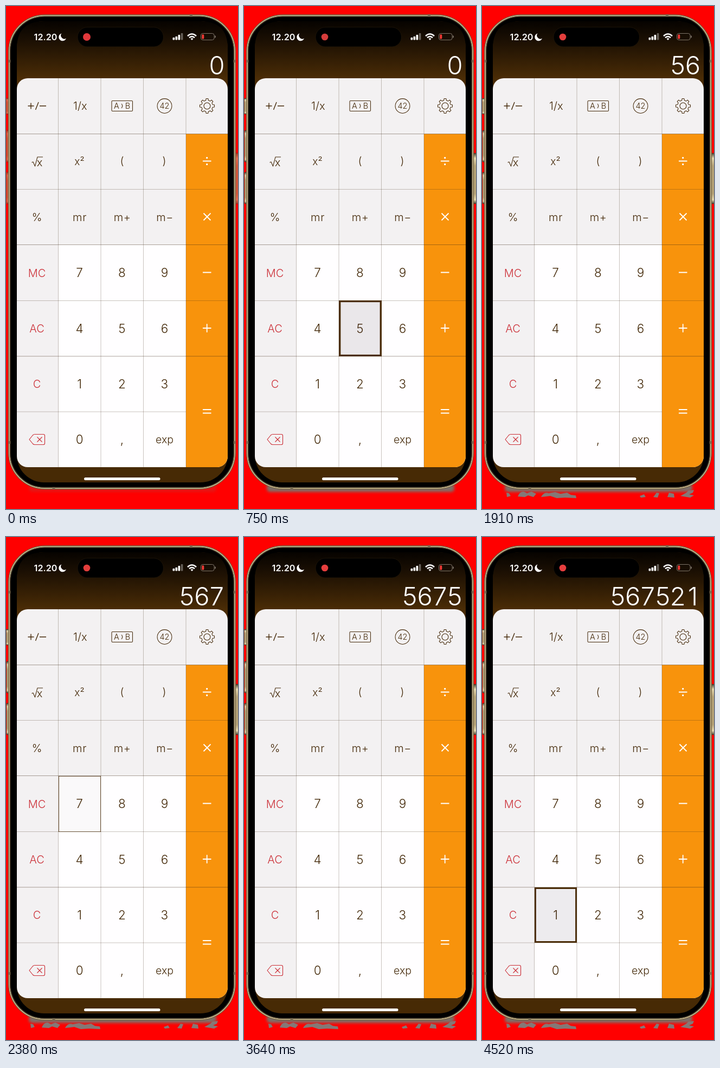
An HTML page for the animation above (4550 ms loop, 428x926 px).

```html
<!DOCTYPE html>
<html lang="en">
<head>
<meta charset="utf-8">
<title>Calculator</title>
<style>
  html, body { margin: 0; width: 100%; height: 100%; overflow: hidden; background: #f00; }
  #stage { position: absolute; left: 0; top: 0; width: 428px; height: 926px; overflow: hidden; }
  svg { position: absolute; left: 0; top: 0; display: block; }
  text { font-family: Inter, Roboto, sans-serif; text-anchor: middle; }

  #stage, #stage * { animation-duration: 4550ms; animation-iteration-count: infinite; animation-timing-function: linear; }

  .keys text { font-size: 20px; font-weight: 300; fill: #452a0a; }
  .keys .num text { font-size: 22.5px; }
  .keys .small text { font-size: 14.5px; }
  .keys .red text { fill: #cc3038; }
  .readout text { font-size: 47px; font-weight: 300; fill: #fff; }

  .zero { animation-name: zero; }
  .strip { animation-name: strip; }
  .zero, .strip, .warm, .glow, .blotA, .blotB, .presses { animation-timing-function: step-end !important; }
  @keyframes zero { 0% { opacity: 1 } 18.02%, 100% { opacity: 0 } }
  @keyframes strip {
    0% { transform: translateX(27.7px) }
    18.02% { transform: translateX(0) }
    32.09% { transform: translateX(-27.7px) }
    49.01% { transform: translateX(-55.4px) }
    71.87% { transform: translateX(-83.1px) }
    84.83% { transform: translateX(-110.8px) }
    97.36%, 100% { transform: translateX(-138.5px) }
  }

  .presses { animation-name: late; }
  @keyframes late { 0% { visibility: hidden } 10%, 100% { visibility: visible } }
  .press { position: absolute; width: 78.5px; height: 102.5px; animation-name: press; animation-delay: calc(var(--at) * 1ms - 4550ms); }
  @keyframes press {
    0% { background: rgba(25,10,30,.07); box-shadow: inset 0 0 0 2.5px #4a2c08 }
    1.32%, 2.64% { background: rgba(25,10,30,.13); box-shadow: inset 0 0 0 5px #4a2c08 }
    5.82%, 100% { background: rgba(25,10,30,0); box-shadow: inset 0 0 0 0 #4a2c08 }
  }

  .warm { animation-name: warm; }
  @keyframes warm { 0% { opacity: .65 } .66%, 100% { opacity: 0 } }
  .glow { animation-name: glow; }
  @keyframes glow { 0% { opacity: .2 } .66%, 100% { opacity: 1 } }
  .blotA { animation-name: blotA; }
  @keyframes blotA { 0% { opacity: 0 } 27.91% { opacity: 1 } 41.98%, 100% { opacity: 0 } }
  .blotB { animation-name: blotB; }
  @keyframes blotB { 0% { opacity: 0 } 41.98%, 100% { opacity: 1 } }
  .dot { animation-name: dot; }
  @keyframes dot {
    0% { fill: #e0383c; r: 7px }
    2% { r: 6.3px }
    8%, 12% { fill: #c43a3a }
    20%, 59% { fill: #e33e3c }
    70% { fill: #d43c3c }
    80%, 100% { fill: #e63e3e; r: 6.3px }
  }
</style>
</head>
<body>
<div id="stage">
<svg width="428" height="926" viewBox="0 0 428 926">
  <defs>
    <linearGradient id="top" x1="0" y1="28" x2="0" y2="133" gradientUnits="userSpaceOnUse">
      <stop offset="0" stop-color="#060300"/><stop offset=".35" stop-color="#1c1003"/><stop offset="1" stop-color="#4a2c06"/>
    </linearGradient>
    <linearGradient id="gold" x1="0" y1="0" x2="0" y2="1">
      <stop offset="0" stop-color="#4a4030"/><stop offset=".1" stop-color="#e4d6ac"/><stop offset=".25" stop-color="#b5a276"/>
      <stop offset=".8" stop-color="#b5a276"/><stop offset=".92" stop-color="#e4d6ac"/><stop offset="1" stop-color="#4a4030"/>
    </linearGradient>
    <clipPath id="pad"><rect x="20" y="133" width="389" height="716" rx="20"/></clipPath>
    <clipPath id="view"><rect x="20" y="80" width="382.8" height="53"/></clipPath>
    <filter id="soft" x="-10%" y="-100%" width="120%" height="300%"><feGaussianBlur stdDeviation="2.4"/></filter>
  </defs>

  <rect width="428" height="926" fill="#f00"/>
  <rect class="glow" x="42" y="880" width="346" height="14.5" rx="6" fill="#7b716a" filter="url(#soft)"/>
  <g fill="#857876">
    <path class="blotA" d="M47 905l3-11 5 2 2 8-5-3zM66 904q1-8 12-9l7 2-3 6zM81 897l6-1-3 8zM109 905l4-9 10-2 8 3-2 8-9-2zM140 905q4-10 9-9l5 9zM314 897l10-1 1 5-5 4-6-1zM366 903l9-7 15-4 1 6-10 1-7 4z"/>
    <path class="blotB" d="M45 896l5 1 3 5-7 2zM66 903q3-9 11-9l6 3 8-3 9 4-5 6-10-3-6 3zM109 904q5-10 14-7l12-2 10 3 12-2 7 4 9 1 1 5-21-1-15 1-12-4zM291 902l8-3 3 5-9 1zM316 904l6-8 5 1-3 8zM342 904l3-8 9 2 1 7zM366 902l11-6 4-4 10-1-2 5-7 3 9 2-7 4z"/>
  </g>

  <!-- body and side buttons -->
  <g fill="url(#gold)" stroke="#3a2d1a" stroke-width=".6">
    <rect x=".5" y="170" width="4.5" height="29" rx="1"/>
    <rect x="1" y="229" width="4.5" height="58" rx="1"/>
    <rect x="1" y="306" width="4.5" height="58" rx="1"/>
    <rect x="423.5" y="271" width="5" height="93" rx="1"/>
  </g>
  <path class="warm" fill="#e0301c" d="M0 170h5v29H0zM0 229h5v58H0zM0 306h5v58H0zM423 271h5v93h-5z"/>
  <rect x="4.5" y="16" width="419" height="873.5" rx="67" fill="#7a6a48" stroke="#6f6043"/>
  <rect x="6.3" y="17.8" width="415.4" height="869.9" rx="65" fill="#000" stroke="#cdbd94" stroke-width="1.7"/>
  <rect x="8" y="19.5" width="412" height="866.5" rx="63" fill="#000" stroke="#3d3424" stroke-width="1.6"/>
  <path d="M4 101.5h4M420 101.5h4M4 803.5h4M420 803.5h4M341.5 15.5v4M88 886v4" stroke="#766a52" stroke-width="5"/>
  <rect x="20" y="28" width="389" height="849" rx="50" fill="#472a05"/>
  <path d="M20 154V78q0-50 50-50h289q50 0 50 50v76z" fill="url(#top)"/>

  <!-- status bar -->
  <rect x="132" y="39" width="158.5" height="36" rx="18" fill="#000" stroke="#21170a" stroke-width=".8"/>
  <circle class="dot" cx="149" cy="57" r="6.3" fill="#e33e3c"/>
  <text x="73" y="62.8" font-size="16.2" font-weight="600" fill="#fff">12.20</text>
  <path d="M102.5 50.5a7 7 0 1 0 8.500 9a6.300 6.300 0 0 1-8.500-9z" fill="#fff"/>
  <g fill="#fff">
    <rect x="307.5" y="58" width="3.7" height="4.5" rx="1"/>
    <rect x="312.5" y="56" width="3.7" height="6.5" rx="1"/>
    <rect x="317.5" y="53" width="3.7" height="9.5" rx="1"/>
    <rect x="322.7" y="50" width="3.7" height="12.5" rx="1" opacity=".35"/>
  </g>
  <g fill="none" stroke="#fff" stroke-width="2.6">
    <path d="M335 55.2q8-7.400 16 0M338 58.4q5-4.600 10 0"/>
    <path d="M340.5 60.2q2.500-2 5 0l-2.500 2.800z" fill="#fff" stroke="none"/>
  </g>
  <rect x="359.5" y="50.5" width="24.5" height="12" rx="3.6" fill="none" stroke="#7d7469"/>
  <rect x="361.3" y="52.3" width="4" height="8.4" rx="1.8" fill="#f03a36"/>
  <path d="M385.6 54.5q2 2 0 4z" fill="#7d7469" stroke="#7d7469"/>

  <!-- readout -->
  <g class="readout" clip-path="url(#view)">
    <text class="zero" x="389" y="125.8">0</text>
    <g class="strip" id="strip"></g>
  </g>

  <!-- keypad -->
  <g clip-path="url(#pad)">
    <rect x="20" y="133" width="389" height="716" fill="#f3f1f2"/>
    <rect x="96.5" y="439.5" width="235.5" height="410" fill="#fffeff"/>
    <rect x="332" y="235.5" width="77" height="614" fill="#f8930c"/>
    <g fill="none" stroke="#3c2814">
      <path stroke-opacity=".28" d="M96.5 133V849M175 133V849M253.5 133V849M332 133V849M20 337.5H409M20 542.5H409M20 747H332"/>
      <path stroke-opacity=".42" d="M20 235.5H409M20 439.5H409M20 644.8H409"/>
    </g>
  </g>

  <g class="keys">
    <text x="136.8" y="191">1/x</text>
    <text x="135.5" y="293" style="font-size:19px">x²</text>
    <text x="214" y="292">(</text>
    <text x="292" y="292">)</text>
    <text x="57" y="395.5">%</text>
    <text x="136" y="395.5" letter-spacing=".6">mr</text>
    <text x="214.5" y="395.5" letter-spacing=".6">m+</text>
    <text x="293" y="395.5" letter-spacing=".6">m−</text>
    <text x="292.5" y="805" style="font-size:19.5px">exp</text>
    <text x="62" y="295">x</text>
    <g class="small">
      <text x="292.5" y="189.3">42</text>
      <text x="204" y="189.3">A</text>
      <text x="224.5" y="189.3">B</text>
    </g>
    <g class="red">
      <text x="57" y="498.5">MC</text>
      <text x="57" y="601">AC</text>
      <text x="57" y="703">C</text>
    </g>
    <g class="num" id="num"></g>
  </g>

  <g fill="none" stroke="#452a0a" stroke-width="1.05" stroke-linejoin="round">
    <path d="M40.5 184h11M46 178.5v11M54.5 191l5.500-14M62 184h12" stroke-width="1.4"/>
    <path d="M47.5 288l2.500-1 3.500 8 4.500-17h10"/>
    <rect x="195" y="174.5" width="38.5" height="19" rx="1.5"/>
    <path d="M213 180q3.600 4 0 8"/>
    <circle cx="292.5" cy="184" r="13.4"/>
    <circle cx="371" cy="184" r="6"/>
    <path id="gear"/>
  </g>
  <path d="M43 798l6.500-8q1.500-1.500 3.500-1.500h16q2.500 0 2.500 2.500v14q0 2.500-2.500 2.500H53q-2 0-3.500-1.500zM57.5 793.5l9 9M66.5 793.5l-9 9" fill="none" stroke="#cc3038" stroke-width="1.15" stroke-linejoin="round"/>
  <g stroke="#fff" stroke-width="1.8" fill="none">
    <path d="M363 285.5h15.500M364.5 381.5l13 13M377.5 381.5l-13 13M363 490.5h15.500M363 593h15.500M370.7 585.3v15.500M363 743h15.500M363 749.5h15.500"/>
    <path d="M370.7 278v3M370.7 290v3" stroke-width="2.8"/>
  </g>
  <rect x="144" y="868" width="140.5" height="5" rx="2.5" fill="#fff"/>
</svg>
<div class="presses" id="presses"></div>
</div>
<script>
  const cols = [135.6, 214, 292.4], rows = [499.3, 601.6, 703.8, 806];
  const label = (s, x, y) => `<text x="${x}" y="${y}">${s}</text>`;
  const byId = id => document.getElementById(id);

  byId('num').innerHTML = [...'7894561230,']
    .map((s, i) => label(s, cols[i % 3], rows[i / 3 | 0])).join('');
  byId('strip').innerHTML = [...'567521']
    .map((s, i) => label(s, 389 + 27.7 * i, 125.8)).join('');

  // [start ms, column, row] of each key press
  byId('presses').innerHTML = [[730, 1, 1], [1370, 2, 1], [2140, 0, 0], [3180, 1, 1], [3770, 1, 2], [4340, 0, 2]]
    .map(([at, c, r]) => `<div class="press" style="--at:${at};left:${96.5 + 78.5 * c}px;top:${440 + 102.4 * r}px"></div>`).join('');

  const spoke = (deg, r) => {
    const a = deg * Math.PI / 180;
    return (371 + r * Math.sin(a)).toFixed(1) + ' ' + (184 - r * Math.cos(a)).toFixed(1);
  };
  const teeth = [];
  for (let d = 0; d < 360; d += 45)
    teeth.push(spoke(d - 13, 10.5), spoke(d - 8, 13.6), spoke(d + 8, 13.6), spoke(d + 13, 10.5));
  byId('gear').setAttribute('d', 'M' + teeth.join('L') + 'Z');
</script>
</body>
</html>
```
